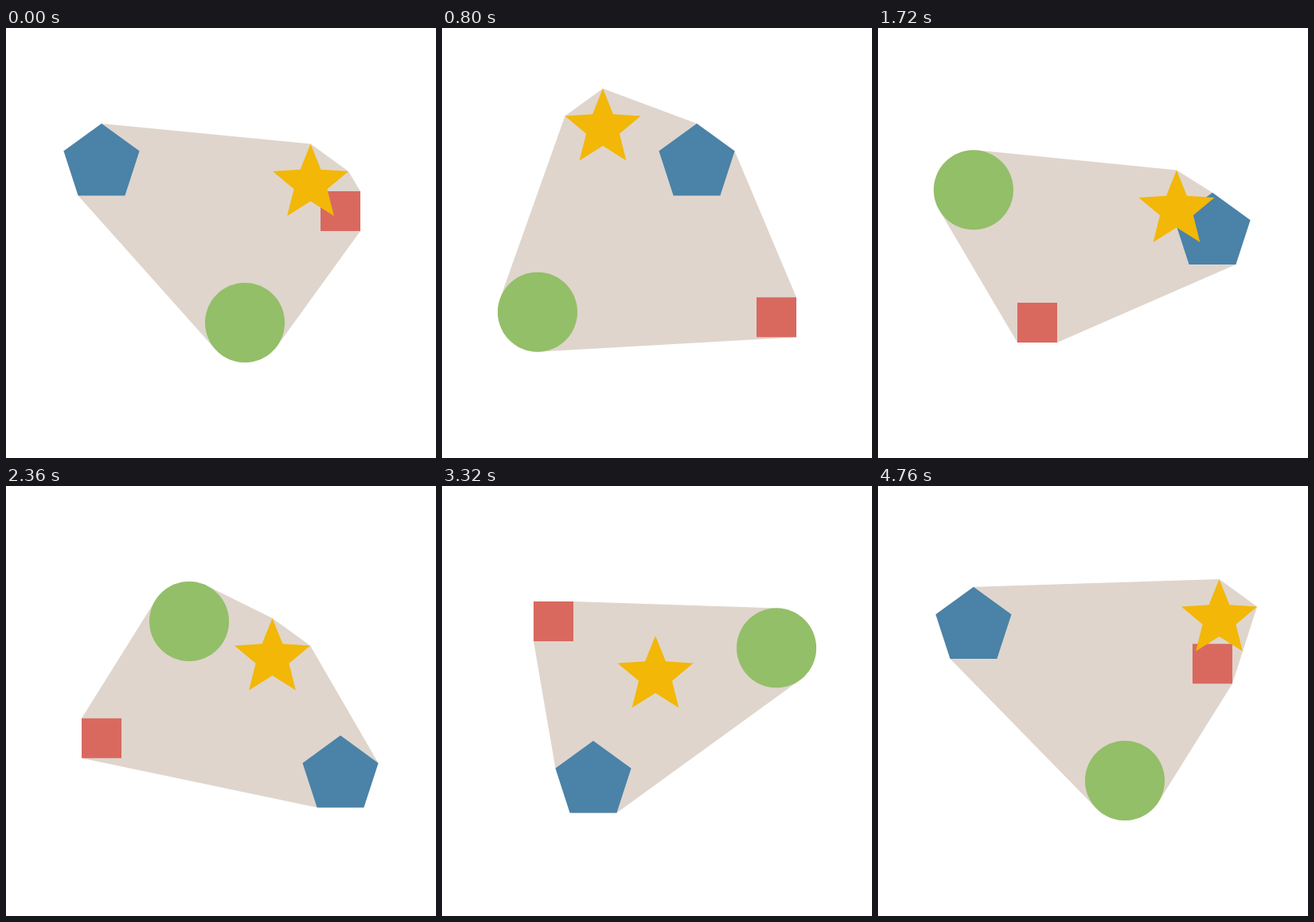
An HTML page with a canvas that plays this animation: 540x540 px, repeating every 4800 ms.

```html
<!DOCTYPE html>
<html lang="en">
<head>
<meta charset="utf-8">
<title>Convex hull</title>
<style>
html, body { margin: 0; width: 100%; height: 100%; overflow: hidden; background: #fff; }
canvas { display: block; }
</style>
</head>
<body>
<canvas id="stage" width="540" height="540"></canvas>
<script>
const ctx = document.getElementById('stage').getContext('2d');
const STEP = 40, STEPS = 120, SIZE = 540;

// Closed rectangular track, a quarter of the loop per side
function onTrack(step) {
  const lap = step % STEPS / (STEPS / 4), k = lap % 1;
  const [u, v] = [[k, 0], [1, k], [1 - k, 1], [0, 1 - k]][Math.floor(lap)];
  return [120 + 300 * u, 170 + 200 * v];
}

// Key points of the wandering star: step, x, y
const wander = [
  [0, 382.5, 195.5], [20, 202, 126], [43, 375, 228.5], [59, 334.5, 216], [72, 298, 417],
  [83, 268, 238], [88, 335, 62], [102, 491.5, 314], [112, 456.5, 166], [119, 428.5, 167]
];

function onWander(step) {
  const next = wander.findIndex(key => key[0] >= step) || 1;
  const [s0, x0, y0] = wander[next - 1], [s1, x1, y1] = wander[next];
  const k = (step - s0) / (s1 - s0);
  return [x0 + (x1 - x0) * k, y0 + (y1 - y0) * k];
}

// Outline starting at the given angle; radii alternate when two differ
function ring(count, outer, inner = outer, turn = -Math.PI / 2) {
  return Array.from({ length: count }, (_, i) => {
    const a = i / count * 2 * Math.PI + turn, r = i % 2 ? inner : outer;
    return [r * Math.cos(a), r * Math.sin(a)];
  });
}

const square = ring(4, 25 * Math.SQRT2, undefined, Math.PI / 4);
const shapes = [
  { color: '#d9695f', points: square, at: s => onTrack(s + 39) },
  { color: '#93bf68', points: ring(120, 50), at: s => onTrack(s + 72) },
  { color: '#4a82a8', points: ring(5, 50), at: onTrack },
  { color: '#f2b707', points: ring(10, 50, 22), at: onWander }
];

function hull(points) {
  const sorted = [...points].sort((a, b) => a[0] - b[0] || a[1] - b[1]);
  const half = list => {
    const out = [];
    for (const p of list) {
      while (out.length > 1) {
        const [a, b] = out.slice(-2);
        const turn = (b[0] - a[0]) * (p[1] - a[1]) - (b[1] - a[1]) * (p[0] - a[0]);
        if (turn > 0) break;
        out.pop();
      }
      out.push(p);
    }
    return out.slice(0, -1);
  };
  return [...half(sorted), ...half(sorted.reverse())];
}

function fill(points, color) {
  ctx.beginPath();
  points.forEach(p => ctx.lineTo(p[0], p[1]));
  ctx.closePath();
  ctx.fillStyle = color;
  ctx.fill();
}

function draw(step) {
  const outlines = shapes.map(shape => {
    const [x, y] = shape.at(step);
    return shape.points.map(p => [p[0] + x, p[1] + y]);
  });
  ctx.clearRect(0, 0, SIZE, SIZE);
  fill(hull(outlines.flat()), '#dfd5cc');
  outlines.forEach((points, i) => fill(points, shapes[i].color));
}

const start = performance.now();
function tick() {
  const elapsed = performance.now() - start;
  draw(Math.floor(elapsed / STEP) % STEPS);
  requestAnimationFrame(tick);
}
tick();
</script>
</body>
</html>
```
